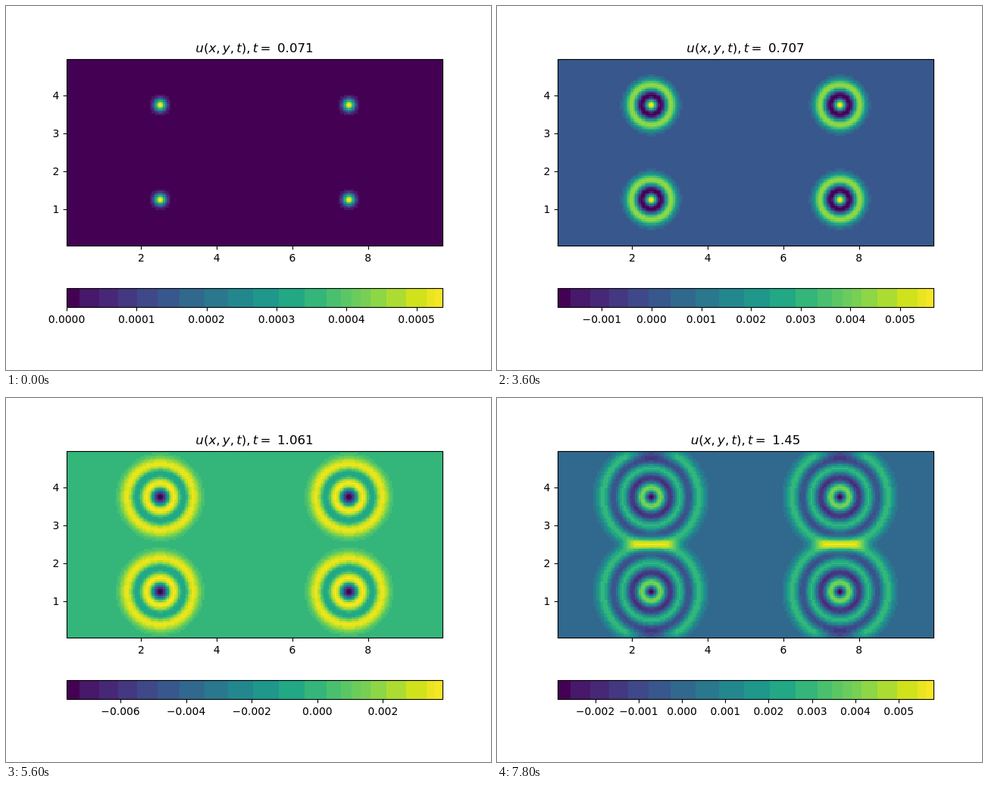
These frames come from a looping animation (640 px wide and 480 px high, 8 s). An HTML page with a canvas:

```html
<!DOCTYPE html>
<html lang="en">
<head>
<meta charset="utf-8">
<title>Wave equation with four oscillating sources</title>
<style>
  html, body { margin: 0; width: 100%; height: 100%; overflow: hidden; background: #fff; }
  canvas { display: block; }
</style>
</head>
<body>
<canvas id="stage" width="640" height="480"></canvas>
<script>
const ctx = document.getElementById('stage').getContext('2d');
const FONT = '"DejaVu Sans", sans-serif';
const FRAMES = 40, FRAME_MS = 200;

// Grid of the wave equation u_tt = u_xx + u_yy + sin(4 pi t) g(x, y), u = 0 on the walls
const NX = 201, NY = 101, DX = 0.05, DT = DX / Math.SQRT2;
const COLS = NX - 2, ROWS = NY - 2;

// Plot geometry in pixels
const LEFT = 80, WIDTH = 496, BOTTOM = 316.32;
const SCALE = WIDTH / (COLS * DX);
const HEIGHT = ROWS * DX * SCALE;
const BAR_TOP = 372, BAR_HEIGHT = 25;

const STOPS = ['440154', '481a6c', '472f7d', '414487', '39568c', '31688e', '2a788e', '23888e', '1f988b',
  '22a884', '35b779', '54c568', '7ad151', 'a5db36', 'd2e21b', 'fde725']
  .map(hex => [0, 2, 4].map(i => parseInt(hex.slice(i, i + 2), 16)));
// Colour band limits on a scale of 0 to 256
const EDGES = [-9, 9, 22, 35, 48, 62, 77, 94, 110, 127, 144.5, 162, 177, 187, 194, 200, 207, 218, 231, 245, 251, 256];

function viridis(f) {
  const p = Math.min(Math.max(f, 0), 1) * (STOPS.length - 1);
  const i = Math.min(Math.floor(p), STOPS.length - 2);
  return STOPS[i].map((c, k) => Math.round(c + (STOPS[i + 1][k] - c) * (p - i)));
}
const bands = EDGES.slice(1).map((end, i) => ({
  start: Math.max(EDGES[i], 0), end, rgb: viridis((EDGES[i] + end) / 512)
}));
const palette = Array.from({ length: 512 }, (_, i) => bands.find(b => i / 2 < b.end).rgb);

function simulate() {
  const source = new Float64Array(NX * NY);
  for (let j = 0; j < NY; j++) for (let i = 0; i < NX; i++)
    for (const cx of [2.5, 7.5]) for (const cy of [1.25, 3.75])
      source[j * NX + i] += Math.exp(-40 * ((i * DX - cx) ** 2 + (j * DX - cy) ** 2));

  const states = [new Float64Array(NX * NY), new Float64Array(NX * NY)];
  for (let n = 1; n <= FRAMES; n++) {
    const before = states[n - 1], now = states[n], next = new Float64Array(NX * NY);
    const force = DT * DT * Math.sin(4 * Math.PI * n * DT);
    for (let j = 1; j < NY - 1; j++) for (let i = 1; i < NX - 1; i++) {
      const p = j * NX + i;
      const laplacian = now[p - 1] + now[p + 1] + now[p - NX] + now[p + NX] - 4 * now[p];
      next[p] = 2 * now[p] - before[p] + laplacian / 2 + force * source[p];
    }
    states.push(next);
  }
  return states.slice(2);
}
const states = simulate();

const field = document.createElement('canvas');
field.width = COLS;
field.height = ROWS;
const fieldCtx = field.getContext('2d');
const pixels = fieldCtx.createImageData(COLS, ROWS);

function range(u) {
  let min = Infinity, max = -Infinity;
  for (let j = 1; j <= ROWS; j++) for (let i = 1; i <= COLS; i++) {
    const v = u[j * NX + i];
    if (v < min) min = v;
    if (v > max) max = v;
  }
  return [min, max];
}

function text(str, x, y, align, size = 13.889) {
  ctx.font = `${size}px ${FONT}`;
  ctx.textAlign = align;
  ctx.fillText(str, x, y);
}

function line(x1, y1, x2, y2) {
  ctx.beginPath();
  ctx.moveTo(x1, y1);
  ctx.lineTo(x2, y2);
  ctx.stroke();
}

const snap = v => Math.floor(v + 0.5) + 0.5;

function xTick(x, y, label) {
  line(snap(x), y, snap(x), y + 4.9);
  text(label, x, y + 20.5, 'center');
}

function drawField(u, min, max) {
  let k = 0;
  for (let j = ROWS; j >= 1; j--) for (let i = 1; i <= COLS; i++) {
    const level = Math.floor((u[j * NX + i] - min) / (max - min) * 512);
    const [r, g, b] = palette[Math.min(level, 511)];
    pixels.data[k++] = r;
    pixels.data[k++] = g;
    pixels.data[k++] = b;
    pixels.data[k++] = 255;
  }
  fieldCtx.putImageData(pixels, 0, 0);
  ctx.imageSmoothingEnabled = false;
  ctx.drawImage(field, LEFT, BOTTOM - HEIGHT, WIDTH, HEIGHT);
}

function drawAxes() {
  ctx.strokeRect(LEFT + 0.5, 70.5, WIDTH, 246);
  for (const x of [2, 4, 6, 8]) xTick(LEFT + (x - DX / 2) * SCALE, 316.5, x);
  for (const y of [1, 2, 3, 4]) {
    const py = snap(BOTTOM - (y - DX / 2) * SCALE);
    line(LEFT + 0.5, py, LEFT - 4.4, py);
    text(y, 70.3, py + 4.7, 'right');
  }
}

function tickStep(span) {
  const raw = span / 9, power = Math.floor(Math.log10(raw));
  const unit = 10 ** power;
  const factor = [1, 2, 2.5, 5, 10].find(s => s * unit >= raw);
  const decimals = -power + (factor === 2.5 ? 1 : factor === 10 ? -1 : 0);
  return [factor * unit, decimals];
}

function drawColorbar(min, max) {
  for (const { start, end, rgb } of bands) {
    const x1 = Math.round(LEFT + start / 256 * WIDTH), x2 = Math.round(LEFT + end / 256 * WIDTH);
    ctx.fillStyle = `rgb(${rgb})`;
    ctx.fillRect(x1, BAR_TOP, x2 - x1, BAR_HEIGHT);
  }
  ctx.fillStyle = '#000';
  ctx.strokeRect(LEFT + 0.5, BAR_TOP + 0.5, WIDTH, BAR_HEIGHT);

  const span = max - min, slack = span * 1e-5;
  const [step, decimals] = tickStep(span);
  for (let n = Math.ceil((min - slack) / step); n * step <= max + slack; n++) {
    const label = (n < 0 ? '\u2212' : '') + Math.abs(n * step).toFixed(decimals);
    xTick(LEFT + (n * step - min) / span * WIDTH, BAR_TOP + BAR_HEIGHT + 0.5, label);
  }
}

function drawTitle(time) {
  const size = 16.667, gap = 3.24;
  const parts = [...'u(x,y,t),t='].map(ch => ({
    str: ch,
    style: /[a-z]/.test(ch) ? 'italic ' : '',
    before: ch === '=' ? gap : 0,
    after: ch === ',' || ch === '=' ? gap : 0
  }));
  parts.push({ str: ' ' + Number(time.toFixed(3)), style: '', before: 0, after: 0 });
  for (const p of parts) {
    p.font = `${p.style}${size}px ${FONT}`;
    ctx.font = p.font;
    p.width = ctx.measureText(p.str).width;
  }
  let x = 328 - parts.reduce((sum, p) => sum + p.before + p.width + p.after, 0) / 2;
  ctx.textAlign = 'left';
  for (const p of parts) {
    ctx.font = p.font;
    ctx.fillText(p.str, x + p.before, 61);
    x += p.before + p.width + p.after;
  }
}

function draw(frame) {
  const u = states[frame], [min, max] = range(u);
  ctx.fillStyle = '#fff';
  ctx.fillRect(0, 0, 640, 480);
  ctx.fillStyle = ctx.strokeStyle = '#000';
  ctx.lineWidth = 1.11;
  drawField(u, min, max);
  drawAxes();
  drawColorbar(min, max);
  drawTitle((frame + 2) * DT);
}

let shown = -1;
const startTime = performance.now();
function tick() {
  const frame = Math.floor((performance.now() - startTime) / FRAME_MS) % FRAMES;
  if (frame !== shown) draw(shown = frame);
  requestAnimationFrame(tick);
}
tick();
</script>
</body>
</html>
```
